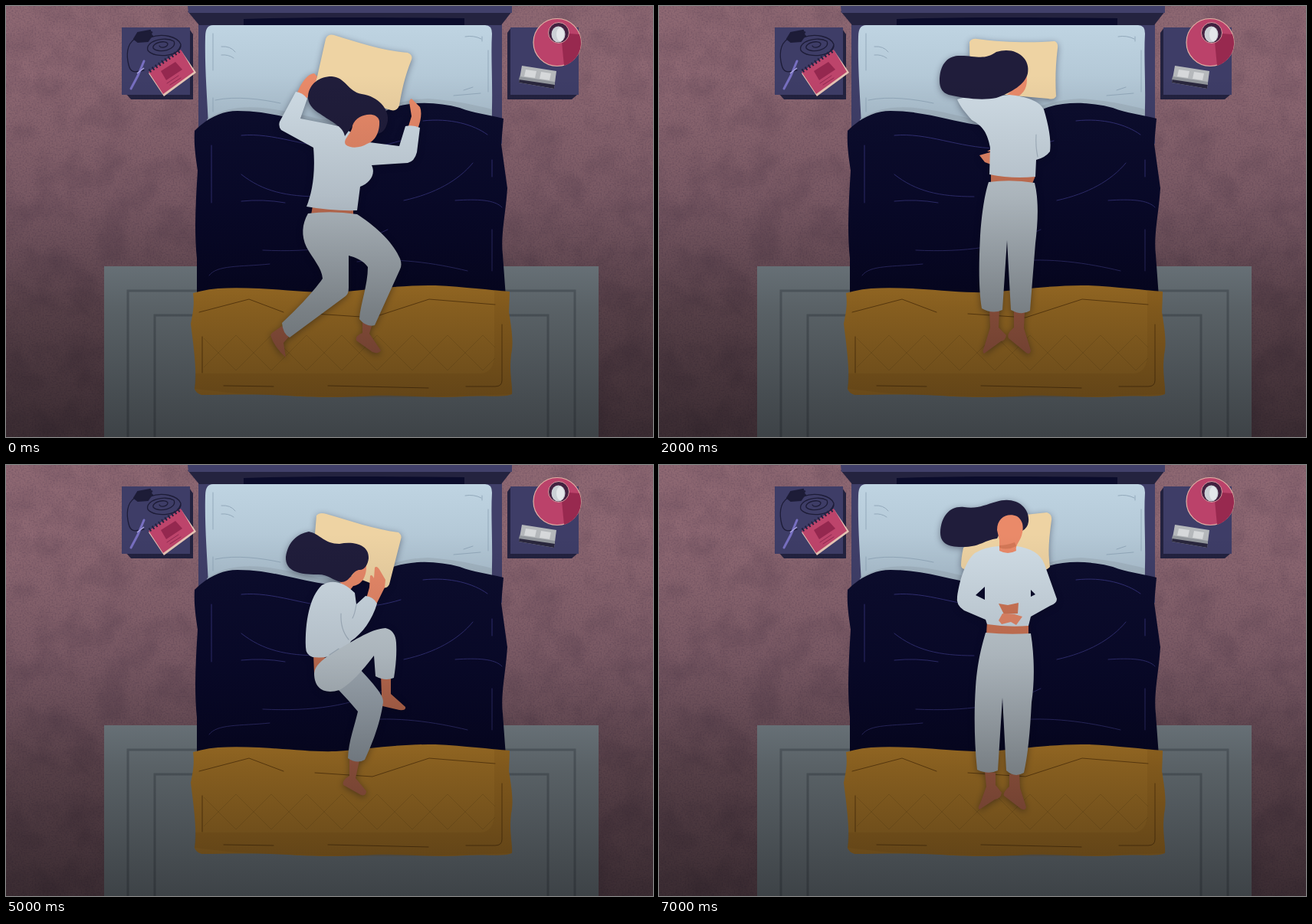
An HTML page for the animation above (8 s loop, 844 by 563 pixels).

```html
<!DOCTYPE html>
<html lang="en">
<head>
<meta charset="utf-8">
<title>Sleeping positions</title>
<style>
html, body { margin: 0; width: 100%; height: 100%; overflow: hidden; background: #84606a; }
svg { display: block; width: 100vw; height: 100vh; }
.line { fill: none; stroke-width: 1; stroke-linecap: round; stroke-linejoin: round; }
.pose { display: none; filter: drop-shadow(0 2px 4px rgba(5, 5, 25, .4)); }
.pillow { fill: #eed3a3; }
.hair { fill: #201d3b; }
.skin { fill: #ea8a69; }
.dim { fill: #d47857; }
.shirt { fill: #d0dde6; }
.sleeve { fill: #c5d3dd; }
.pants { fill: #c8d3d9; }
.far { fill: #b3bfc8; }
.crease { fill: none; stroke: #a9b8c5; stroke-width: 1.2; stroke-linecap: round; }
.gap { fill: #090a29; }
</style>
</head>
<body>
<svg viewBox="0 0 844 563" preserveAspectRatio="none">
  <defs>
    <linearGradient id="night" x1="0" y1="0" x2="0" y2="563" gradientUnits="userSpaceOnUse">
      <stop offset=".16" stop-color="#050510" stop-opacity="0"/>
      <stop offset=".44" stop-color="#050510" stop-opacity=".15"/>
      <stop offset=".7" stop-color="#050508" stop-opacity=".4"/>
      <stop offset="1" stop-color="#050508" stop-opacity=".6"/>
    </linearGradient>
    <linearGradient id="sheet" x1="0" y1="0" x2="0" y2="1">
      <stop stop-color="#bfd4e2"/><stop offset="1" stop-color="#a4b8c7"/>
    </linearGradient>
    <linearGradient id="duvet" x1="0" y1="0" x2="0" y2="1">
      <stop stop-color="#0c0d2d"/><stop offset="1" stop-color="#06062a"/>
    </linearGradient>
    <filter id="grain" x="0" y="0" width="1" height="1">
      <feTurbulence type="fractalNoise" baseFrequency=".5" numOctaves="2" seed="4"/>
      <feColorMatrix values="0 0 0 0 .12  0 0 0 0 .06  0 0 0 0 .1  1 0 0 0 -.4"/>
    </filter>
    <filter id="blotch" x="0" y="0" width="1" height="1">
      <feTurbulence type="fractalNoise" baseFrequency=".025" numOctaves="3" seed="9"/>
      <feColorMatrix values="0 0 0 0 .1  0 0 0 0 .05  0 0 0 0 .08  .7 0 0 0 -.28"/>
    </filter>
    <pattern id="quilt" width="46" height="46" x="254" y="430" patternUnits="userSpaceOnUse">
      <path class="line" stroke="#8d5f18" stroke-opacity=".3" d="M0 0L46 46M46 0L0 46"/>
    </pattern>
  </defs>

  <!-- floor and rug -->
  <rect width="844" height="563" fill="#8e6872"/>
  <rect width="844" height="563" filter="url(#grain)"/>
  <rect width="844" height="563" filter="url(#blotch)"/>
  <rect x="128" y="340" width="645" height="240" fill="#929fa5"/>
  <path d="M159 563V372H742V563M194 563V404H707V563" fill="none" stroke="#737f86" stroke-width="3"/>

  <!-- left nightstand -->
  <path d="M156 114L163 122H244V37L239 30Z" fill="#23223f"/>
  <rect x="151" y="28" width="89" height="88" fill="#3e3d67"/>
  <path d="M167 43L172 35L188 32L190 39L185 46L172 47ZM187 36L191 34M188 41L192 39" fill="#1d1c37" stroke="#1d1c37" stroke-width="2"/>
  <path class="line" stroke="#1d1c37" style="stroke-width:1.3" d="M168 43C157 50 157 65 160 77S169 86 180 84M188 41C204 35 224 40 228 50C230 65 195 70 185 58C181 46 207 39 219 46C224 57 199 63 192 55C190 48 208 44 211 49C211 54 202 56 200 52M228 50C228 57 219 62 217 66"/>
  <path d="M180 72L172 91L163 108" stroke="#776fc0" stroke-width="3" stroke-linecap="round" fill="none"/>
  <path d="M171 88L180 81" stroke="#aaa4e0" stroke-width="1.5"/>
  <path d="M186 88L229 59L248 87L206 118Z" fill="#e6c5b5"/>
  <path d="M186 86L228 57L245 86L205 115Z" fill="#bd446b"/>
  <path d="M202 85L221 73L230 83L209 97Z" fill="#94284f"/>
  <path class="line" stroke="#8f2850" d="M210 101L225 91M214 103L228 94"/>
  <path d="M187 85L227 58" stroke="#242140" stroke-width="5" stroke-dasharray="2 3"/>

  <!-- right nightstand -->
  <path d="M654 35L659 28V116H745L738 122H654Z" fill="#23223f"/>
  <rect x="658" y="28" width="89" height="88" fill="#3e3d67"/>
  <circle cx="719" cy="47.500" r="31" fill="#bb426a" stroke="#e3b0a5" stroke-width="1.200"/>
  <path d="M725 47L728 78A31 31 0 0 0 748 37L734 36Z" fill="#98294f"/>
  <circle cx="721" cy="35" r="13.500" fill="#432140" stroke="#d89aa0"/>
  <ellipse cx="720.500" cy="37" rx="9" ry="10.500" fill="#cbd0d5"/>
  <ellipse cx="723" cy="37" rx="5" ry="9" fill="#e4e7ea"/>
  <path d="M673 78L718 85L715 108L669 100Z" fill="#b5b8bb"/>
  <path d="M670 94L716 102L715 108L669 100Z" fill="#29263d"/>
  <path d="M670 92L716 99V103L669 96Z" fill="#92969c"/>
  <path d="M678 83L692 85L690 94L676 92ZM698 86L711 88L709 97L696 95Z" fill="#d6d8da"/>

  <!-- bed -->
  <path d="M251 20H647V180H251Z" fill="#403f69"/>
  <path d="M237 7H660L646 25H252Z" fill="#24233f"/>
  <path d="M237 0H660V9H238Z" fill="#41406a"/>
  <path d="M310 17C400 14 500 15 598 16V27H310Z" fill="#0b0c2b"/>
  <path d="M270 25H625Q634 25 634 36C632 70 636 110 633 155V190H264V155C262 115 259 75 260 40Q260 25 270 25Z" fill="url(#sheet)"/>
  <path d="M262 148C300 122 350 133 410 148C460 150 500 122 550 121C590 124 615 130 634 135V170H262Z" fill="#9eafbc" opacity=".7"/>
  <path class="line" stroke="#93a9bb" d="M281 53Q293 52 299 60M281 64Q290 63 297 68M270 36V84M270 120V138M273 123C300 117 335 122 358 127M599 40Q610 38 620 43M621 40V46M629 58V112M584 117L619 114M597 110L609 106"/>
  <path d="M246 163C262 147 281 137 302 137C345 137 380 150 414 155C450 160 480 142 508 132C535 124 565 126 592 133C610 140 630 142 649 147L646 180L654 238C652 270 645 300 648 325L652 380H249V330C245 290 248 250 250 215C247 195 245 180 246 163Z" fill="url(#duvet)"/>
  <path class="line" stroke="#323075" d="M307 169C350 165 390 185 440 186C470 187 495 182 515 176M544 150C580 146 610 155 628 168M268 182V257M307 220C335 242 365 249 411 249M307 255Q335 252 364 257M519 254C560 245 590 228 609 205M586 254C615 252 638 253 647 263M634 201V223M634 292V346M335 319C400 322 450 315 498 292M265 352C275 338 305 341 344 337M458 334C510 328 560 336 602 346"/>
  <path d="M244 375C270 367 300 368 330 369C370 371 400 375 430 374C480 370 520 364 560 365C600 367 630 371 657 373L656 400C660 425 662 440 659 455C656 480 661 495 660 507C650 512 630 508 600 510C560 513 520 508 480 509C440 512 400 511 380 510C330 506 290 508 255 508Q247 505 246 500C250 480 244 440 241 415C244 400 246 390 244 375Z" fill="#dc992f"/>
  <path d="M637 371L657 373L656 400C660 425 662 440 659 455C656 480 661 495 660 507C500 514 380 510 300 506L246 500L247 480H620Q637 478 637 455Z" fill="#b97b20" opacity=".3"/>
  <rect x="258" y="430" width="380" height="46" fill="url(#quilt)"/>
  <path class="line" stroke="#875511" d="M252 400L317 383L362 400M403 402L478 407L552 383L638 390M256 432V479M647 416V489Q647 497 638 497H600M284 496L349 497M420 496L551 499"/>

  <g class="pose" id="freefall">
    <path class="pillow" d="M417 43Q420 36 428 38C460 48 490 58 524 61Q531 64 529 70C520 92 516 112 513 130Q510 138 502 136C475 128 440 115 402 110C401 104 404 98 406 92Z"/>
    <path class="skin" d="M380 113C386 99 393 89 402 88L406 92L402 105L391 123ZM524 160L529 144L526 125Q528 118 532 124L540 132Q544 142 537 161Z"/>
    <path class="dim" d="M400 261L398 273L453 274V265ZM347 427L360 418L369 432L362 440L365 459Q350 446 345 430ZM465 413L477 418L474 428L489 450Q486 455 478 452L457 437Q455 431 465 427Z"/>
    <path class="pants" d="M394 271Q425 267 458 272C478 285 503 305 514 330Q517 338 514 344L481 417Q470 420 461 409C462 390 472 365 472 341C467 333 455 328 447 326V368Q447 376 443 379L370 433Q361 428 360 414C375 400 400 375 413 356C412 342 400 330 392 315C385 300 386 285 394 271Z"/>
    <path class="shirt" d="M378 112Q387 113 393 121L384 147L440 158L466 177L513 183L521 157Q531 155 540 159L536 191Q533 203 524 205L477 208C483 220 474 232 462 236L458 267Q425 268 392 262C399 245 404 220 401 185L359 162Q355 157 357 151Z"/>
    <path class="hair" d="M394 117C396 102 408 92 425 92C443 93 446 112 464 115C486 118 500 135 498 150C496 161 490 169 481 166L487 150C482 141 465 141 453 155L442 170C440 157 425 152 410 141C400 135 393 127 394 117Z"/>
    <path class="skin" d="M452 156C458 140 484 137 487 150C488 165 481 177 471 180C463 185 450 187 443 181C439 173 451 168 452 156Z"/>
  </g>

  <g class="pose" id="hug">
    <path class="pillow" d="M359 110Q400 98 420 88C435 85 450 79 461 77Q466 77 468 82C473 105 478 125 486 145Q485 150 478 152L373 161C370 140 362 125 359 110Z"/>
    <path class="skin" d="M402 92Q408 82 418 84Q424 86 426 94L408 99ZM494 211L510 216L517 214L529 219L526 226L512 231L494 229Z"/>
    <path class="dim" d="M366 228L384 235L367 248ZM449 268L463 272L460 292L476 312Q474 316 465 313L444 305Q440 300 448 292ZM393 370L408 373L403 392L411 414Q410 421 400 417L380 402Q377 398 390 390Z"/>
    <path class="hair" d="M361 110C363 95 378 84 398 86C411 90 420 104 427 115C415 130 400 140 385 141C370 138 360 128 361 110ZM438 112C452 102 466 105 471 118C474 130 468 139 460 138C448 140 441 153 425 153Z"/>
    <path class="skin" d="M441 148C450 136 461 134 467 139C467 149 458 158 447 160C436 160 425 161 419 156C422 151 432 151 441 148Z"/>
    <path class="far" d="M393 279L426 254C435 270 446 285 448 300C445 320 425 350 410 370Q397 379 392 366C396 345 405 325 412 307Z"/>
    <path class="sleeve" d="M430 162C440 182 447 195 458 206L490 206Q497 209 495 226L478 232H455Q438 222 418 207L426 188Z"/>
    <path class="pants" d="M363 258C362 246 372 240 385 234C405 228 440 205 462 205Q478 206 476 222C472 240 469 258 466 270Q454 277 443 266L447 239C435 250 415 272 400 277C378 284 364 274 363 258Z"/>
    <path class="shirt" d="M408 97C420 86 445 86 454 97Q460 106 455 115C448 132 437 146 422 152C433 160 434 185 417 215L375 234Q360 232 359 220C360 190 372 165 386 143C402 133 415 122 428 110Z"/>
    <path class="crease" d="M422 152L410 158"/>
  </g>

  <g class="pose" id="prone">
    <path class="pillow" d="M405 47Q408 42 415 43C450 48 490 48 516 46Q521 48 520 55C517 80 517 100 518 118Q515 123 508 121L406 112Z"/>
    <path class="skin" d="M479 88Q483 108 470 117Q462 119 454 116L468 103ZM418 195L432 191L433 207L425 204ZM428 190L433 187V190Z"/>
    <path class="dim" d="M433 219L491 222L487 232L433 230ZM431 396L444 397L443 420L453 430Q452 437 446 438L424 454Q421 452 424 446L432 420ZM463 399H477L476 421L485 450Q484 456 479 453L456 434Q453 428 463 420Z"/>
    <path class="pants" d="M430 230Q460 226 490 231C496 255 494 285 491 310L484 398Q473 405 459 397L454 306L448 397Q435 403 421 395C417 370 417 340 419 300C421 270 425 245 430 230Z"/>
    <path class="shirt" d="M389 122C405 116 430 120 457 116C480 118 497 125 502 135C508 155 512 175 510 190Q504 198 492 201L491 223Q460 226 431 220L432 185C428 162 419 155 408 149C400 140 392 130 389 122Z"/>
    <path class="crease" d="M492 168Q491 183 494 197"/>
    <path class="hair" d="M366 98C366 78 375 66 390 65C412 64 423 72 440 60C465 52 485 68 481 88C478 102 460 113 440 120C420 124 395 120 378 116Q366 112 366 98Z"/>
  </g>

  <g class="pose" id="fetal">
    <path class="pillow" d="M368 131Q369 126 376 126C410 126 445 119 476 113Q482 113 482 120V170L435 197L384 200Q376 200 376 194C376 170 373 150 368 131Z"/>
    <path class="dim" d="M386 332L402 336L407 350L390 372L378 373L388 355ZM396 337L408 334L412 350L423 365L395 382Q390 380 392 376L402 358ZM480 290L466 294L476 306Q481 300 480 292Z"/>
    <path class="skin" d="M411 174L424 178L434 188L442 196L429 210C425 203 419 203 414 200Q408 190 411 174Z"/>
    <path class="dim" d="M384 199L396 178Q400 176 399 184L403 188L402 198L410 217L398 226L387 208Z"/>
    <path class="hair" d="M405 167C407 149 425 143 445 147C462 150 470 135 487 132C505 134 518 150 518 168C515 185 500 190 485 188C470 186 460 199 440 197C434 194 432 181 424 179L411 176Z"/>
    <path class="shirt" d="M428 211C440 196 462 191 473 200C484 212 490 245 489 286Q485 295 474 295L435 272L433 250L424 224Z"/>
    <path class="sleeve" d="M396 228Q400 215 410 213Q417 214 425 233L433 262L430 273Q424 276 419 267C408 256 400 242 396 228Z"/>
    <path class="crease" d="M441 240Q436 253 435 266"/>
    <path class="pants" d="M373 285C375 272 400 267 425 274C445 282 475 293 480 310Q482 330 462 336C440 338 425 325 412 312L414 333Q398 343 378 330Q372 310 373 285Z"/>
    <path class="crease" d="M412 312L410 304"/>
  </g>

  <g class="pose" id="side">
    <path class="pillow" d="M405 66Q409 61 418 64C450 73 480 84 512 88Q517 92 515 97L500 156Q497 162 490 160L400 125Z"/>
    <path class="skin" d="M469 178L474 160L475 145Q477 142 480 148L481 134Q484 131 488 138L495 150L494 160L483 182ZM470 130C471 148 462 157 453 158L446 167L435 152L450 146L458 135Z"/>
    <path class="hair" d="M365 120C368 100 380 90 395 87C410 90 415 103 435 103C455 99 474 105 473 122C472 130 468 138 460 137C450 140 449 153 437 153C425 150 420 142 405 143C385 143 364 140 365 120Z"/>
    <path class="dim" d="M401 247L418 252L402 272ZM489 275L502 276V299L521 316Q522 321 513 320L487 314Q485 310 490 300ZM448 383L461 386L456 409L470 426Q470 433 463 431L440 418Q438 412 448 406Z"/>
    <path class="far" d="M434 294L463 268C478 285 493 300 492 310C488 340 475 370 468 385Q458 391 446 383C447 360 455 340 459 322L447 308Z"/>
    <path class="shirt" d="M412 157C425 149 440 152 455 167L457 182L469 171Q479 172 484 181C478 202 465 220 450 230L447 236Q430 254 400 251Q391 248 391 238C390 205 396 172 412 157Z"/>
    <path class="crease" d="M457 182Q455 195 452 200M437 194Q436 215 447 228"/>
    <path class="pants" d="M402 272C403 262 412 255 425 246C450 232 475 214 495 213Q508 216 509 232C510 250 508 265 506 278Q495 283 482 276L480 249C470 262 452 285 435 294C415 300 402 292 402 272Z"/>
    <path class="crease" d="M422 248L434 240"/>
  </g>

  <g class="pose" id="star">
    <path class="pillow" d="M383 68Q384 62 391 63C425 67 460 66 488 63Q495 64 494 71C491 95 491 110 494 130Q491 136 485 135L392 136Q384 135 385 128C387 105 386 85 383 68Z"/>
    <g id="limbs">
      <path class="skin" d="M338 116L334 100L326 88L337 92L341 82L346 84L351 95L355 114Z"/>
      <path class="dim" d="M375 398L390 400L386 420Q385 428 378 432L360 445Q354 446 358 438L372 420Z"/>
    </g>
    <use href="#limbs" transform="translate(878) scale(-1 1)"/>
    <path class="dim" d="M404 207H474V222H404Z"/>
    <path class="pants" d="M403 219Q440 223 475 219C484 250 492 300 508 395Q498 405 484 402L440 275L394 402Q380 405 370 395C386 300 394 250 403 219Z"/>
    <path class="shirt" d="M425 112Q440 122 455 112L485 122L515 150L524 112Q532 109 540 114C540 140 535 165 527 175Q520 181 510 176L478 160L476 211Q440 215 402 211L400 160L368 176Q358 181 351 175C343 165 338 140 338 114Q346 109 354 112L363 150L393 122Z"/>
    <path class="hair" d="M359 96C361 72 374 59 391 61C408 63 416 56 431 52C456 46 475 60 473 79L466 77C461 67 442 70 436 80L432 99C416 104 411 110 391 111C370 112 359 108 359 96Z"/>
    <path class="skin" d="M423 89C423 72 437 68 448 72Q459 78 456 92C454 104 450 108 451 115Q440 122 429 115L429 104Z"/>
  </g>

  <g class="pose" id="back">
    <path class="pillow" d="M394 131Q394 122 397 108L478 65L506 62Q513 64 512 72C509 95 507 112 510 133Q506 138 500 137L400 136Q394 136 394 131Z"/>
    <path class="dim" d="M428 205L482 208V221H427ZM425 400L439 402V418L447 428Q446 436 438 437L418 450Q415 448 419 442L427 420ZM457 404L470 402L471 422L479 447Q478 452 472 449L450 432Q448 428 457 420Z"/>
    <path class="pants" d="M426 219Q455 222 485 220C490 250 490 285 486 310C484 350 481 380 476 402Q464 409 453 399L448 304L442 399Q430 405 415 398C411 360 411 320 413 290C415 260 420 240 426 219Z"/>
    <path class="shirt" d="M443 106Q455 118 467 106C485 109 497 115 503 130L519 175Q519 181 510 184L485 198L482 210Q455 212 428 208L426 202L398 190Q387 183 389 172C392 150 400 125 412 115Q425 107 443 106Z"/>
    <path class="gap" d="M413 170L425 159V176ZM485 163L491 169L485 172Z"/>
    <path class="hair" d="M367 88C368 66 380 53 398 55C415 58 425 52 440 48C465 40 484 55 482 74Q481 82 474 86L444 90L441 96C425 98 420 106 400 107C378 108 367 103 367 88Z"/>
    <path class="skin" d="M441 85C441 68 455 62 467 67Q477 74 474 88C472 100 464 104 466 112Q455 118 444 112V98Z"/>
    <path class="dim" d="M444 105Q453 105 464 101L466 106Q455 112 444 108Z"/>
    <path class="dim" d="M443 181L455 183L469 180L468 194L450 195Z"/>
    <path class="skin" d="M443 203L448 194L464 195L474 198L466 209L459 205L447 208Z"/>
  </g>

  <rect width="844" height="563" fill="url(#night)"/>
</svg>
<script>
const HOLD = 1000;
const sequence = ["freefall", "hug", "prone", "fetal", "back", "side", "star", "back"];
const poses = document.querySelectorAll(".pose");
const start = performance.now();

function draw(now) {
  const step = Math.floor(Math.max(0, now - start) / HOLD) % sequence.length;
  for (const pose of poses) {
    pose.style.display = pose.id === sequence[step] ? "inline" : "none";
  }
  requestAnimationFrame(draw);
}
draw(start);
</script>
</body>
</html>
```
